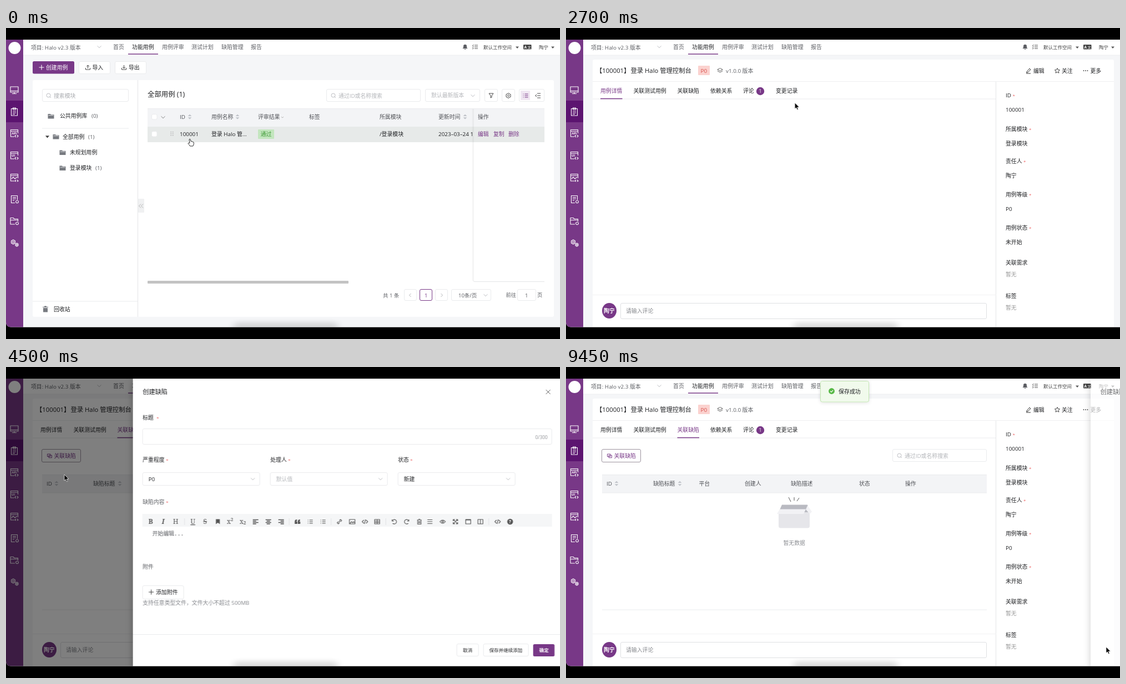
These frames come from a looping animation (998x561 px, 9.6 s). An HTML page:

```html
<!DOCTYPE html>
<html lang="zh-CN">
<head>
<meta charset="utf-8">
<style>
html, body { margin: 0; width: 100%; height: 100%; overflow: hidden; background: #000; }
svg { display: block; width: 998px; height: 561px; }
text { font-family: "Open Sans", "Noto Sans CJK SC", "Noto Sans CJK", sans-serif; white-space: pre; }
.serif { font-family: "Noto Serif", "Liberation Serif", serif; }
.mono { font-family: "DejaVu Sans Mono", monospace; }
</style>
</head>
<body>
<svg id="stage" viewBox="0 0 998 561"></svg>
<script>
const LOOP = 9600;
const PURPLE = '#783887', INK = '#1f2023', MID = '#5c5e63', PALE = '#b4b6ba', EDGE = '#eaebed';
const USER = '陶宁', EMAIL = 'taoning@miston.example';

// Drawing helpers; the y of a text is its middle.
const text = (x, y, s, fill = INK, size = 9.85, weight = 400, extra = '') =>
  `<text x="${x}" y="${y + size * .37}" font-size="${size}" font-weight="${weight}" fill="${fill}" ${extra}>${s}</text>`;
const box = (x, y, x2, y2, fill = '#fff', stroke = 'none', r = 0) =>
  `<rect x="${x}" y="${y}" width="${x2 - x}" height="${y2 - y}" rx="${r}" fill="${fill}" stroke="${stroke}"/>`;
const field = (x, y, x2, y2, stroke = EDGE) => box(x + .5, y + .5, x2 - .5, y2 - .5, '#fff', stroke, 2.5);
const line = (x, y, x2, y2, c = EDGE, w = 1) =>
  `<path d="M${x} ${y}L${x2} ${y2}" stroke="${c}" stroke-width="${w}"/>`;
const icon = (x, y, d, c = MID, w = 1, fill = 'none') =>
  `<path transform="translate(${x} ${y})" d="${d}" fill="${fill}" stroke="${c}" stroke-width="${w}" stroke-linejoin="round"/>`;
const solid = (x, y, d, c = MID) => icon(x, y, d, 'none', 0, c);
const dot = (x, y, r, fill) => `<circle cx="${x}" cy="${y}" r="${r}" fill="${fill}"/>`;
const group = (id, ...parts) => `<g id="${id}">${parts.join('')}</g>`;

const chevron = (x, y, c = PALE) => icon(x, y, 'M-3.5-1.7L0 1.7L3.5-1.7', c, .9);
const caretDown = (x, y) => solid(x, y, 'M-3-1.6H3L0 2Z', '#555');
const sort = (x, y) => solid(x, y, 'M-3.4-1L0-4.2L3.4-1ZM-3.4 1.2H3.4L0 4.4Z', '#bfc2c8');
const search = (x, y) => icon(x, y, 'M3-.5A3.5 3.5 0 1 0-4-.5A3.5 3.5 0 1 0 3-.5M2 2L4 4', '#b5b7bb', .9);
const folder = (x, y) => solid(x, y, 'M-5.5-4H-1L0-2.7H5.5V4.5H-5.5ZM-4.4-1.7V-1H4.4V-1.7Z', '#777a80');
const plus = (x, y, c) => icon(x, y, 'M-4.5 0H4.5M0-4.5V4.5', c, 1.1);
const star = (x, y) => text(x, y, '*', '#ee6a6a', 8);
const code = 'M-2-3L-5 0L-2 3M2-3L5 0L2 3M1-4L-1 4';
const list = 'M-4-3H-3M-1-3H5M-4 0H-3M-1 0H5M-4 3H-3M-1 3H5';

function shell() {
  const nav = [[193, '首页'], [227, '功能用例'], [281, '用例评审'], [334, '测试计划'], [388, '缺陷管理'], [441, '报告']];
  const side = [
    [112, 'M-7-6H7V4H-7ZM0 4V6.5M-4 6.5H4M-7 1.5H7'],
    [151, 'M-5.5-5.5H5.5V7H-5.5ZM-2.5-7H2.5V-4H-2.5ZM-3-1H3M-3 2H3M-3 4.5H1'],
    [190, 'M0 6H-6.5V-6.5H6.5V0M-6.5-3.8H6.5M3 3L1 5L3 7M5 3L7 5L5 7'],
    [230, 'M0 6H-6.5V-6.5H6.5V0M-6.5-3.8H6.5M3 3L1 5L3 7M5 3L7 5L5 7'],
    [270, 'M0 6H-6.5V-6.5H6.5V1M-6.5-3.8H6.5M-5 2L-2-1L1 2L5-1M3 4L1 6L3 7M5 4L7 6L5 7'],
    [309, 'M1 6.5H-5.5V-6.5H5.5V1M-3-3.5H3M-3-1H3M-3 2H0M5 2A2.4 2.4 0 1 0 5.1 2'],
    [348, 'M1 6H-7V-5.5H-2L0-3.5H6.5V1M-7-1.5H6.5M5 2A2.4 2.4 0 1 0 5.1 2'],
    [388, 'M-2-6L1.5-4V0L-2 2L-5.5 0V-4ZM-2-3.5A1.6 1.6 0 1 0-1.9-3.5M4.5 0L7 1.5V4.5L4.5 6L2 4.5V1.5ZM4.5 2A1 1 0 1 0 4.6 2']
  ];
  return group('shell',
    box(31, 21, 998, 541, '#f5f6f8'), box(31, 21, 998, 49), line(31, 49, 998, 49, '#eeeff1'),
    box(0, 21, 31, 541, PURPLE), box(0, 131, 31, 170, '#5c1470'), dot(15.5, 36, 11, '#fff'),
    side.map(([y, d]) => icon(15, y, d, '#fff', 1.1)).join(''),
    text(15, 189.5, 'API', '#fff', 5.5, 700, 'text-anchor="middle"'), text(13, 229.5, 'UI', '#fff', 5.5, 700, 'text-anchor="middle"'),
    text(45, 35, '项目: Halo v2.3 版本', MID), chevron(168, 34),
    nav.map(([x, s]) => text(x, 34.5, s, x === 227 ? INK : MID, 9.9)).join(''),
    line(220, 47, 274, 47, PURPLE, 1.6),
    solid(827, 34, 'M-4.5 3L-3 1V-1A3 3.2 0 0 1 3-1V1L4.5 3ZM-1 3.7H1V5H-1Z'),
    icon(845, 34, 'M-5-3L-4-2L-2.5-4M-1-3H5M-5 0L-4 1L-2.5-1M-1 0H5M-5 3L-4 4L-2.5 2M-1 3H5', '#555'),
    text(860, 34.5, '默认工作空间', '#444', 8.5), caretDown(921, 35),
    box(932, 30, 946.5, 38.5, '#444', 'none', 1), text(933.5, 34.3, 'A', '#fff', 6.5, 700), text(939.5, 34.3, '文', '#fff', 6),
    text(960, 34.5, USER, '#444', 8.5), caretDown(985, 35));
}

function listPage() {
  const heads = [[313, 'ID'], [370, '用例名称'], [454, '评审结果'], [546, '标签'], [673, '所属模块'], [779, '更新时间']];
  const row = '#e7eae9', head = '#f3f4f6';
  return group('listPage',
    box(48, 60, 123, 82.5, PURPLE, 'none', 2.5), plus(64, 71, '#fff'), text(72, 71, '创建用例', '#fff', 9.85, 500),
    field(131, 60, 188, 83), icon(147.5, 71, 'M-4 1V4H4V1M0 2V-4M-2.5-1.5L0-4L2.5-1.5', '#444'), text(155.5, 71, '导入'),
    field(196, 60, 253, 83), icon(212.5, 71, 'M-4 1V4H4V1M0 2V-4M-2.5-.5L0 2L2.5-.5', '#444'), text(221, 71, '导出'),
    box(48, 94, 987, 521, '#fff', 'none', 3), line(237.5, 94, 237.5, 521, '#e4e5e7'),
    field(65, 110, 221, 133), search(77, 122), text(86, 122, '搜索模块', '#a9abaf'),
    folder(81, 159), text(97, 158.5, '公共用例库'), text(154, 158.5, '(0)', MID),
    line(65, 181, 221, 181), solid(74.5, 196, 'M-3.6-1.8H3.6L0 2.4Z', '#444'), folder(90, 196), text(102, 196, '全部用例'), text(148, 196, '(1)', MID),
    folder(102, 224.5), text(115, 224, '未规划用例'), folder(102, 252.5), text(115, 252.5, '登录模块'), text(161, 252.5, '(1)', MID),
    line(48, 493, 237, 493), solid(71, 507, 'M-5-4H-2V-5.5H2V-4H5V-3H-5ZM-4-2H4V5.5H-4Z', '#777a80'), text(86, 507, '回收站'),
    box(238, 308, 249, 333, '#f0f1f2', 'none', 1), icon(243, 321, 'M0-3.5L-3.5 0L0 3.5M4-3.5L.5 0L4 3.5', '#aaa', .9),
    text(255, 119.5, '全部用例 (1)', INK, 12.4, 500),
    field(577, 110, 747, 133), search(590, 122), text(599, 122, '通过ID或名称搜索', PALE),
    field(755, 110, 854, 133), text(766, 121.5, '默认最新版本', PALE), chevron(841, 122),
    field(862, 110, 886, 133), icon(874, 122, 'M-4-4H4L1 0V3L-1 4V0Z', '#444'),
    field(893, 110, 917, 133), icon(905, 122, 'M0-4.5L4-2.2V2.2L0 4.5L-4 2.2V-2.2ZM0-1.6A1.6 1.6 0 1 0 .1-1.6', '#444'),
    field(924, 110, 970, 133), box(927, 113, 944, 130, '#f0e6f2'), icon(935.5, 122, list, PURPLE), icon(958, 122, 'M-1-4H5M-1 0H5M-1 4H5M-2-2L-4.5 0L-2 2', '#444'),
    box(255, 146, 970, 178, head), line(255, 145.5, 970, 145.5), box(255, 178, 970, 206, row),
    field(262, 155, 272.5, 165.5), chevron(283, 161, '#777'),
    heads.map(([x, s]) => text(x, 160.5, s, '#505257')).join(''),
    sort(331, 160), sort(417, 160), sort(827, 160), icon(498, 161, 'M-2-1L0 1L2-1', '#999', .7),
    field(262, 186, 272.5, 196.5), icon(299, 191, 'M-1.7-4V4M1.7-4V4', '#999', '1.2" stroke-dasharray="1.3 1.7'),
    text(313, 191.5, '100001'), text(370, 191.5, '登录 Halo 管...'),
    box(454, 183, 483, 200, '#c3e6be', 'none', 1), text(458.7, 191.3, '通过', '#3e9a36'),
    text(673, 191.5, '/登录模块'), text(779, 191.5, '2023–03–24 1'),
    box(842, 146, 970, 178, head), box(842, 178, 970, 206, row), box(842, 206, 970, 456),
    box(839, 146, 842.5, 456, 'url(#sideShade)'), icon(842, 456, 'M0 0Q0 1.5 3 1.5H128', '#e4e5e7'),
    text(850, 160.5, '操作', '#505257'), [[850, '编辑'], [878, '复制'], [905, '删除']].map(([x, s]) => text(x, 191.5, s, PURPLE)).join(''),
    box(255, 456, 617, 461, '#c3c3c3', 'none', 1),
    text(679, 482, '共 1 条', MID, 9.5), field(717, 471, 740, 492), icon(728, 482, 'M1.5-3L-1.5 0L1.5 3', PALE),
    field(745, 471, 768, 492, PURPLE), text(754, 482, '1', PURPLE, 9.5),
    field(773, 471, 796, 492), icon(785, 482, 'M-1.5-3L1.5 0L-1.5 3', PALE),
    field(802, 471, 874, 492), text(815, 482, '10条/页', MID, 9.5, 500), chevron(864, 482),
    text(900.5, 482, '前往', MID, 9.2), field(921, 471, 955, 492), text(935, 482, '1', MID, 9.5), text(957, 482, '页', MID, 9.2));
}

function detailPage() {
  const tabs = [[62, '用例详情'], [121.5, '关联测试用例'], [200.5, '关联缺陷'], [260, '依赖关系'], [319, '评论'], [378, '变更记录']];
  const heads = [[73, 'ID'], [157, '缺陷标题'], [239.5, '平台'], [322, '创建人'], [405, '缺陷描述'], [528, '状态'], [611, '操作']];
  const facts = [[121, 'ID', '100001', 804.5], [182, '所属模块', '登录模块', 834], [240, '责任人', USER, 824], [300, '用例等级', 'P0', 834],
    [360.5, '用例状态', '未开始', 834], [423, '关联需求', '暂无'], [483.5, '标签', '暂无']];
  const active = i => text(tabs[i][0], 113, tabs[i][1], PURPLE, 9.85, 500) + line(tabs[i][0], 127.5, tabs[i][0] + 39.5, 127.5, PURPLE, 1.6);
  return group('detailPage',
    box(48, 57, 987, 541, '#fff', 'none', 3), line(48, 96.5, 987, 96.5, '#eeeff1'), line(48, 128, 775, 128),
    line(774.5, 97, 774.5, 541, '#e4e5e7'), line(48, 481.5, 775, 481.5, '#f1f2f3'),
    text(54, 77, '【100001】', INK, 11.3, 500), text(116.5, 77, '登录 Halo 管理控制台', INK, 11.3, 500),
    box(238, 68, 259, 85, '#fbd2cf', 'none', 1), text(242.5, 77, 'P0', '#d8504b'),
    icon(277.5, 77, 'M0-4.5L4.7-2L0 .5L-4.7-2ZM-4.7 .5L0 3L4.7 .5', '#555', .9), text(288, 77, 'v1.0.0 版本', MID),
    icon(833, 77, 'M-3 2L2-4L4-2L-1 3L-3.5 3.5ZM-4 5H4', '#333'), text(842, 77, '编辑', INK, 9.85, 500),
    icon(885, 77, 'M0-4.5L1.4-1.5L4.6-1.2L2.2 1L3 4.2L0 2.5L-3 4.2L-2.2 1L-4.6-1.2L-1.4-1.5Z', '#333', .9), text(893, 77, '关注', INK, 9.85, 500),
    [932.5, 936, 939.5].map(x => dot(x, 77, .9, '#444')).join(''), text(944.5, 77, '更多', INK, 9.85, 500),
    tabs.map(([x, s], i) => i % 2 || i > 2 ? text(x, 113, s, INK, 9.85, 500) : '').join(''),
    dot(350, 114, 7.2, PURPLE), text(347.5, 113.7, '1', '#fff', 8.5),
    group('infoTab', active(0), text(200.5, 113, '关联缺陷', INK, 9.85, 500)),
    group('bugTab', active(2), text(62, 113, '用例详情', INK, 9.85, 500),
      field(64, 148, 135, 172, '#9d949f'), icon(78.5, 160, 'M-4-3H1.5V1.5H-4ZM-1.5 -.8H4V3.7H-1.5Z', PURPLE, .9), text(86.5, 160, '关联缺陷', PURPLE),
      field(588, 148, 758, 171), search(601, 160), text(610, 160, '通过ID或名称搜索', PALE),
      box(65, 194, 758, 227, '#f3f4f6'), line(65, 194.5, 758, 194.5), line(65, 227, 758, 227),
      heads.map(([x, s]) => text(x, 210.5, s, '#505257')).join(''), sort(91, 210), sort(205, 210),
      icon(410, 239, 'M-9-4L-5 4M1-4V2M10-3L6 3', '#555'),
      solid(411, 270, 'M-28-10H28V17Q28 20.5 24 20.5H-24Q-28 20.5-28 17Z', '#e6e6ea'),
      solid(411, 270, 'M-22-21.5H24L28-8H-28Z', '#b9bac1'), solid(411, 270, 'M-26-13.5H21L17-5H-31ZM24-20L32-9L28-5L21-13Z', '#f2f2f5'),
      text(391.5, 317, '暂无数据', '#8b8d92'), line(65, 438, 758, 438)),
    `<ellipse cx="78" cy="510" rx="13" ry="14" fill="${PURPLE}"/>`, text(68, 510.3, USER, '#fff', 9.85, 700),
    field(98, 496, 758, 525, '#dfe0e3'), text(108, 510.5, '请输入评论', '#85878c'),
    facts.map(([y, name, value, mark]) => text(792, y, name, INK, 9.85, 500) + (mark ? star(mark, y + 1) : '') +
      text(792, y + (mark ? 26 : 21), value, mark ? INK : '#999')).join(''),
    group('linkMenu', box(54, 180, 145.5, 245, '#fff', '#ebecef" filter="url(#soft)', 3), box(54, 187, 145.5, 212, '#efe7f1'),
      text(68, 199.5, '创建缺陷', PURPLE), text(68, 225.5, '关联现有缺陷', MID)));
}

function toolbar() {
  const glyph = (x, s, extra) => `<text class="serif" x="${x}" y="283" font-size="12" text-anchor="middle" fill="#555" ${extra}>${s}</text>`;
  const bars = (x, shift) => icon(x, 279, `M-5-3.5H5M${shift - 5}-1H${shift + 1}M-5 1.5H5M${shift - 5} 4H${shift + 1}`, '#555', 1.3);
  const at = { 546: list, 569: list, 599: 'M-1 1L1-1M0-2L2-4L4-2L2 0M0 2L-2 4L-4 2L-2 0', 622: 'M-5-4H5V4H-5ZM-4 3L-1 0L1 2L3 0L5 3',
    645: code, 667: 'M-4.5-4H4.5V4H-4.5ZM-4.5-1H4.5M-4.5 1.5H4.5M0-4V4', 698: 'M-4-4V-1H-1M-4-1A4 4 0 1 1-3 3', 720: 'M4-4V-1H1M4-1A4 4 0 1 0 3 3',
    743: 'M-4-3H4M-1.5-4.5H1.5M-3-3V4.5H3V-3M-1-1V3M1-1V3', 762: 'M-4.5-3.5H4.5M-4.5 0H4.5M-4.5 3.5H4.5', 785: 'M-5 0Q0-6 5 0Q0 6-5 0ZM0-1.5A1.5 1.5 0 1 0 .1-1.5',
    808: 'M-4-1V-4H-1M1-4H4V-1M4 1V4H1M-1 4H-4V1M-4-4L4 4M4-4L-4 4', 831: 'M-4.5-4H4.5V4H-4.5ZM-4.5-3H4.5', 853: 'M-4.5-4H4.5V4H-4.5ZM0-4V4', 884: code };
  return box(244, 265, 982, 288, '#f5f6f7') +
    glyph(259, 'B', 'font-weight="700"') + glyph(281.5, 'I', 'font-style="italic" font-weight="600"') + glyph(304, 'H', 'font-weight="500"') +
    glyph(335, 'U', 'text-decoration="underline"') + glyph(357, 'S', 'text-decoration="line-through"') +
    solid(380, 279, 'M-3.5-4.5H3.5V4.5L0 1.7L-3.5 4.5Z', '#555') + glyph(402, 'x²', '') + glyph(425, 'x₂', '') +
    bars(448, 0) + bars(471, 2) + bars(494, 4) + solid(523.5, 279, 'M-5 4V0Q-5-4-1-4V-2L-2 0H-.5V4ZM.5 4V0Q.5-4 4.5-4V-2L3.5 0H5V4Z', '#555') +
    Object.entries(at).map(([x, d]) => icon(x, 279, d, '#555', 1.15)).join('') +
    [320, 508.5, 584, 682.5, 868].map(x => line(x, 273, x, 285, '#e2e3e5')).join('') +
    dot(906.5, 279, 5.2, '#555') + text(904.3, 279, '?', '#fff', 8.5, 700);
}

function drawer() {
  const label = (x, y, s, mark, c = INK, w = 500) => text(x, y, s, c, 9.85, w) + star(mark, y + 1);
  const count = n => text(974, 126.5, `${n}/300`, '#909297', 8.4, 400, 'text-anchor="end"');
  return group('drawer', box(227, 21, 998, 541, '#fff', 'none" filter="url(#deep)'),
    text(244.5, 45, '创建缺陷', INK, 11.2, 500),
    group('form', icon(975, 45, 'M-4-4L4 4M4-4L-4 4', '#666'),
      label(244.5, 91, '标题', 269.5), field(244, 111, 982, 140), group('focusRing', field(244, 111, 982, 140, '#9b9da1')),
      group('emptyTitle', count(0)), group('titleText', text(255, 126, '登录提示信息不完整'), count(9)),
      group('caret', line(344.5, 119, 344.5, 133, '#333')),
      label(244.5, 167, '严重程度', 286.5), label(474.5, 167, '处理人', 506.5), label(704.5, 167, '状态', 726.5),
      [244, 474, 704].map(x => field(x, 190, x + 212, 214) + chevron(x + 199, 202)).join(''),
      text(255, 202, 'P0'), text(715, 202, '新建'),
      group('noOwner', text(485, 202, '默认值', PALE)), group('owner', text(485, 202, `${USER} (${EMAIL})`)),
      label(244.5, 243, '缺陷内容', 286.5, MID, 400), toolbar(),
      group('noBody', text(262, 300.5, '开始编辑', MID), text(301, 300.5, '...', MID, 9.85, 400, 'class="mono"')),
      group('bodyText', text(262, 300.5, '当用户名或密码输入不正确时，应提供完整的提示信息', '#444')),
      text(244.5, 360.5, '附件', MID), field(244, 394, 319, 419), plus(260, 406, '#444'), text(268.5, 406.5, '添加附件'),
      text(244.5, 425.5, '支持任意类型文件，文件大小不超过 500MB', '#85878c'),
      line(227, 482.5, 998, 482.5), field(810, 499, 850, 522), text(821.5, 511, '取消', INK, 8.5, 500),
      field(858, 499, 940, 522), text(869, 511, '保存并继续添加', INK, 8.5, 500),
      box(948, 500, 986.5, 522, PURPLE, 'none', 2.5), text(959, 511, '确定', '#fff', 8.5, 700),
      group('options', box(474, 219, 686, 331, '#fff', '#e6e7ea" filter="url(#soft)', 3), box(475, 224, 686, 247, '#f4eff5'),
        text(485, 235.5, `${USER} (${EMAIL})`))));
}

const cursor = group('cursor',
  group('arrow', icon(0, 0, 'M0 0V11L2.5 8.7L4.3 12.6L6.2 11.8L4.4 8H8Z', '#fff', .7, '#000')),
  group('hand', icon(0, 0, 'M-1 1Q0-1 1.2 1L2 4.5Q3.4 3.7 4 5Q5.3 4.4 5.8 5.7Q7.4 5.5 7.4 7.5Q7.5 10 5.8 13H.5Q-1 10.5-3 8.5Q-3 6.8-.8 7.4L0 7.7Z', '#222', .95, '#fff')),
  group('beam', icon(0, 0, 'M-2.5-6Q0-6 0-4Q0-6 2.5-6M0-4V4M-2.5 6Q0 6 0 4Q0 6 2.5 6M-1.3 1.5H1.3', '#222')));

document.getElementById('stage').innerHTML = `<defs>
  <clipPath id="window"><path d="M0 21H998V539.5H9Q0 539.5 0 530.5Z"/></clipPath>
  <linearGradient id="sideShade"><stop stop-color="#000" stop-opacity="0"/><stop offset="1" stop-color="#000" stop-opacity=".07"/></linearGradient>
  <filter id="soft" x="-20%" y="-20%" width="140%" height="140%"><feDropShadow dx="0" dy="1" stdDeviation="3" flood-opacity=".12"/></filter>
  <filter id="deep" x="-20%" y="-20%" width="140%" height="140%"><feDropShadow dx="0" dy="4" stdDeviation="7" flood-opacity=".3"/></filter>
  <filter id="blur" x="-20%" y="-200%" width="140%" height="500%"><feGaussianBlur stdDeviation="7 4"/></filter>
  </defs><g clip-path="url(#window)">` +
  box(0, 21, 998, 541) + shell() + listPage() + detailPage() + group('shade', box(0, 21, 998, 541, '#000')) + drawer() +
  group('toast', box(458.5, 25.5, 545.5, 63, '#f1faec', '#c4e6b4" filter="url(#soft)', 3), dot(478.5, 43.5, 5.4, '#58b947'),
    icon(478.5, 43.5, 'M-2.4 0L-.6 1.8L2.5-1.5', '#fff', 1.1), text(491, 44, '保存成功', INK, 9.95, 500)) +
  '<rect x="410" y="531" width="188" height="18" rx="7" fill="#000" opacity=".13" filter="url(#blur)"/>' + cursor + '</g>';

// Motion: every table is [time in ms, value], held until the next entry.
const play = (id, frames) => document.getElementById(id).animate(frames, { duration: LOOP, iterations: Infinity });
function hold(id, prop, table) {
  const frames = table.map(([t, v]) => ({ offset: t / LOOP, [prop]: v, easing: 'step-end' }));
  play(id, [...frames, { offset: 1, [prop]: table.at(-1)[1] }]);
}
function show(id, ...spans) {
  const table = spans.map((t, i) => [t, i % 2 ? 0 : 1]).filter(([t]) => t < LOOP);
  hold(id, 'opacity', spans[0] ? [[0, 0], ...table] : table);
}

show('shell', 0, 1600, 1900, LOOP);
show('listPage', 0, 1600);
show('detailPage', 2100, LOOP);
show('infoTab', 2100, 3300);
show('bugTab', 3300, LOOP);
show('linkMenu', 4000, 4400);
show('form', 4400, 9450);
show('focusRing', 5400, 6500);
show('emptyTitle', 0, 5500);
show('titleText', 5500, LOOP);
show('caret', 5500, 5800, 6000, 6300);
show('options', 6600, 7500);
show('noOwner', 0, 7500);
show('owner', 7500, LOOP);
show('noBody', 0, 7900);
show('bodyText', 7900, LOOP);
show('toast', 9450, LOOP);
hold('shade', 'opacity', [[0, 0], [4400, .35], [4500, .5], [9450, 0]]);
hold('drawer', 'opacity', [[0, 0], [4400, .9], [4500, 1], [9450, .66]]);
hold('drawer', 'transform', [[0, 780], [4400, 180], [4500, 1.6], [4600, 0], [9450, 718]].map(([t, x]) => [t, `translate(${x}px, 0px)`]));
show('hand', 0, 1000, 2900, 3900, 4000, 4400, 6300, 7500, 9000, 9450);
show('arrow', 1000, 2900, 3900, 4000, 4400, 5400, 8200, 9000, 9450, LOOP);
show('beam', 5400, 6300, 7500, 8200);

// Pointer moves: start, number of 100 ms steps, end point.
const place = (x, y) => `translate(${x}px, ${y}px)`;
let spot = place(331, 200);
const path = [{ offset: 0, transform: spot, easing: 'step-end' }];
for (const [t, n, x, y] of [[100, 3, 326, 192], [400, 3, 344, 185], [1000, 6, 863, 193], [2100, 10, 219, 110],
  [3900, 2, 100, 157], [4100, 2, 105, 194], [5100, 4, 353, 122], [6300, 1, 526, 199], [6800, 4, 545, 232],
  [7500, 3, 376, 302], [8200, 2, 761, 432], [8800, 4, 973, 505]]) {
  path.push({ offset: t / LOOP, transform: spot, easing: `steps(${n}, start)` });
  spot = place(x, y);
  path.push({ offset: (t + n * 100) / LOOP, transform: spot, easing: 'step-end' });
}
play('cursor', [...path, { offset: 1, transform: spot }]);
</script>
</body>
</html>
```
